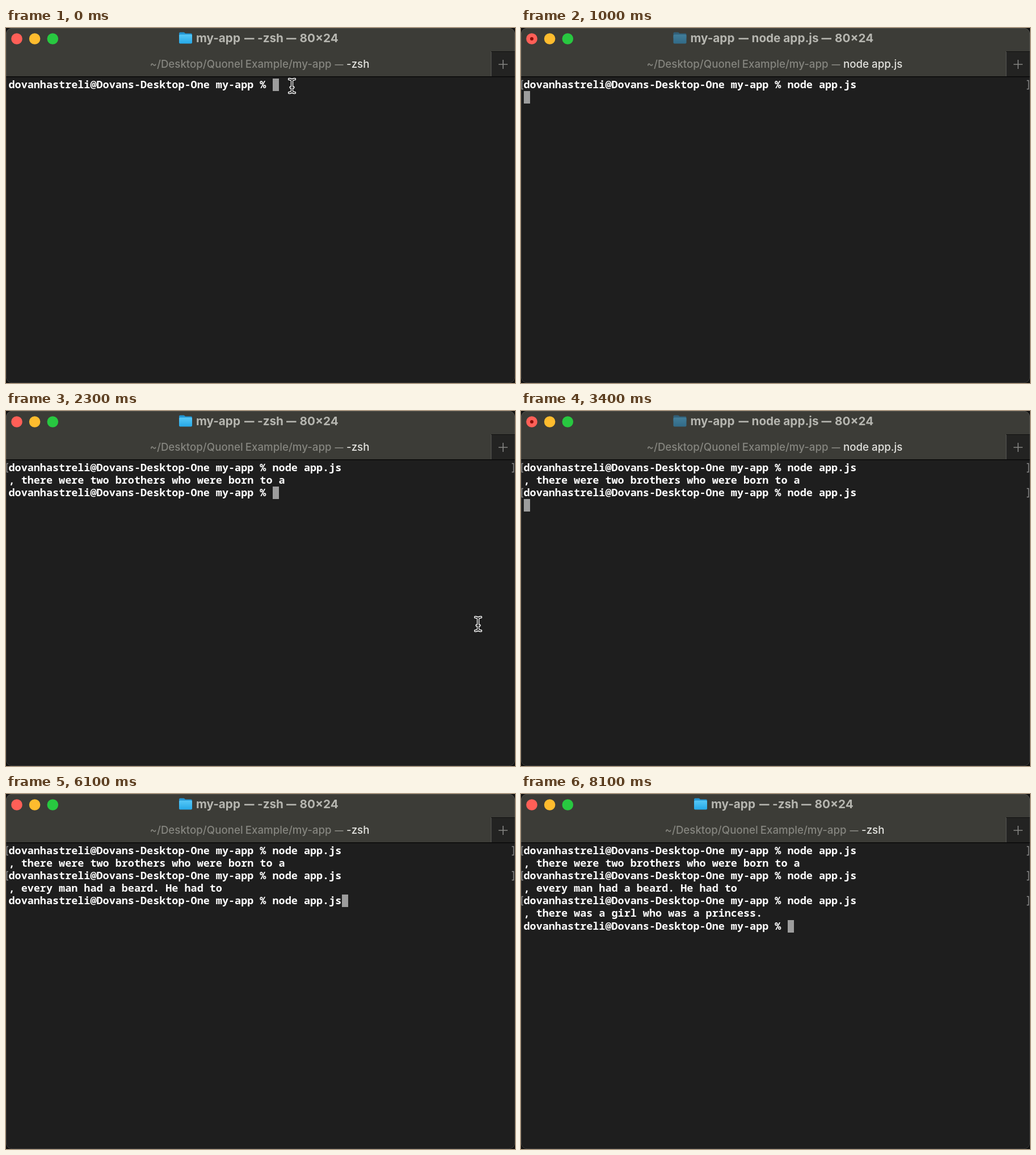
An HTML page with a canvas that plays this animation: 897x625 px, repeating every 9.66 s.

```html
<!DOCTYPE html>
<html lang="en">
<head>
<meta charset="utf-8">
<title>Terminal</title>
<style>
  html, body { margin: 0; width: 100%; height: 100%; overflow: hidden; background: #111; }
  canvas { display: block; width: 897px; height: 625px; }
</style>
</head>
<body>
<canvas id="stage" width="897" height="625"></canvas>
<script>
const ctx = document.getElementById('stage').getContext('2d');
const LOOP = 9660;
const MONO = '600 18.47px "Noto Sans Mono", monospace';
const BOLD = '700 20.7px Inter, sans-serif';
const SANS = '500 18.7px Inter, sans-serif';
const LEFT = 4.5, COL = 11.08, ROW = 22.17, TOP = 88.6;
const PROMPT = 'dovanhastreli@Dovans-Desktop-One my-app % ';
const COMMAND = 'node app.js';

// Each run: command recalled, return pressed, spinner shown, output printed.
const RUNS = [
  { typed: 100, enter: 700, spin: 1100, done: 1900, out: ', there were two brothers who were born to a' },
  { typed: 2700, enter: 3400, spin: 3700, done: 4400, out: ', every man had a beard. He had to' },
  { typed: 5900, enter: 6500, spin: 6800, done: 7400, out: ', there was a girl who was a princess.' }
];

// Pointer stops: time, x, y
const POINTER = [[1300, 905, 640], [1400, 890, 530], [1500, 868, 430],
                 [1600, 852, 373], [1800, 840, 373], [2000, 832, 375]];

function text(str, x, y, font, color, align = 'left') {
  ctx.font = font;
  ctx.fillStyle = color;
  ctx.textAlign = align;
  ctx.fillText(str, x, y);
}

function rect(x, y, w, h, color) {
  ctx.fillStyle = color;
  ctx.fillRect(x, y, w, h);
}

function disc(x, y, r, color) {
  ctx.fillStyle = color;
  ctx.beginPath();
  ctx.arc(x, y, r, 0, Math.PI * 2);
  ctx.fill();
}

function stroke(path, color, width) {
  ctx.strokeStyle = color;
  ctx.lineWidth = width;
  ctx.stroke(new Path2D(path));
}

function folder(x, dim) {
  const fill = ctx.createLinearGradient(0, 10, 0, 27);
  fill.addColorStop(0, dim ? '#437f9b' : '#5bcbf8');
  fill.addColorStop(1, dim ? '#326b88' : '#27a9e8');
  ctx.fillStyle = dim ? '#315f78' : '#2194d2';
  ctx.fill(new Path2D(`M${x} 9.5q0-2 2-2h6q1 0 2 1l1 1h10q2 0 2 2v6h-23z`));
  ctx.fillStyle = fill;
  ctx.beginPath();
  ctx.roundRect(x, 11.5, 23, 16, 2);
  ctx.fill();
}

function titleBar(busy) {
  rect(0, 0, 897, 85, '#3c3c37');
  rect(0, 85, 897, 1.5, '#090909');
  disc(19, 19, 9.8, '#ff5f57');
  disc(50.6, 19, 9.8, '#febc2e');
  disc(82.3, 19, 9.8, '#28c840');
  if (busy) disc(19, 19, 3, '#8c0d08');

  const x = busy ? 268.5 : 305;
  const gray = '#b6b6b0';
  const end = busy ? 261 : 189;
  folder(x, busy);
  text('my-app', x + 30, 24.5, BOLD, gray);
  rect(x + 115, 17.5, 17.5, 2.6, gray);
  text(busy ? COMMAND : '-zsh', x + 138, 24.5, BOLD, gray);
  rect(x + end, 17.5, 17.5, 2.6, gray);
  text('80×24', x + end + 23.5, 24.5, BOLD, gray);
}

function tabBar(busy) {
  const x = busy ? 221.5 : 253.5;
  const gray = '#85857f';
  text('~/Desktop/Quonel', x, 70, SANS, gray);
  text('Example/my-app', x + 320, 70, SANS, gray, 'right');
  rect(x + 326, 64, 15, 1.7, gray);
  text(busy ? COMMAND : '-zsh', x + 346.5, 70, SANS, '#e3e3df');
  rect(855, 41, 42, 44, '#232322');
  rect(854.5, 41, 1, 44, '#5b5b56');
  rect(855, 41, 42, 1, '#111');
  stroke('M868 64h16M876 56v16', '#858583', 1.6);
}

function spinner(head) {
  ctx.lineCap = 'round';
  for (let i = 0; i < 8; i++) {
    const age = (head - i + 80) % 8;
    const a = i * Math.PI / 4;
    const dx = Math.sin(a), dy = -Math.cos(a);
    stroke(`M${835.5 + dx * 6.5} ${63.5 + dy * 6.5}L${835.5 + dx * 11} ${63.5 + dy * 11}`,
           `rgba(236,236,230,${0.92 - age * 0.1})`, 2.5);
  }
  ctx.lineCap = 'butt';
}

function line(str, row) {
  text(str, LEFT, TOP + 17 + row * ROW, MONO, '#fff');
}

function brackets(row) {
  const y = Math.round(TOP + row * ROW) + 3.5;
  stroke(`M4 ${y}H1.5v15H4M891.5 ${y}h3v15h-3`, '#8e8e8e', 1.4);
}

function cursor(col, row) {
  rect(Math.round(LEFT + col * COL), Math.round(TOP + row * ROW), 11, 22, '#9d9d9d');
}

function terminal(t) {
  let row = 0;
  for (const run of RUNS) {
    const typed = t >= run.typed;
    line(PROMPT + (typed ? COMMAND : ''), row);
    if (t < run.enter) {
      cursor(PROMPT.length + (typed ? COMMAND.length : 0), row);
      return;
    }
    brackets(row++);
    if (t < run.done) {
      cursor(0, row);
      return;
    }
    line(run.out, row++);
  }
  line(PROMPT, row);
  cursor(PROMPT.length, row);
}

function pointerAt(t) {
  if (t < 700) return [504, 102];
  if (t < POINTER[0][0] || t >= 2700) return null;
  const next = POINTER.findIndex(p => p[0] > t);
  if (next < 0) return POINTER.at(-1).slice(1);
  const [t0, x0, y0] = POINTER[next - 1], [t1, x1, y1] = POINTER[next];
  const k = (t - t0) / (t1 - t0);
  return [x0 + (x1 - x0) * k, y0 + (y1 - y0) * k];
}

function pointer([x, y]) {
  const beam = 'M-5-12Q-1-12 0-9.5Q1-12 5-12M0-9.5V9.5M-2.5 2.5H2.5M-5 12Q-1 12 0 9.5Q1 12 5 12';
  ctx.save();
  ctx.translate(x, y);
  ctx.lineJoin = 'round';
  ctx.lineCap = 'round';
  stroke(beam, '#fff', 4.4);
  stroke(beam, '#111', 1.7);
  ctx.restore();
}

function draw(now) {
  const t = Math.floor(now % LOOP / 100) * 100;
  const active = RUNS.find(r => t >= r.enter && t < r.done);
  rect(0, 0, 897, 625, '#111');
  ctx.save();
  ctx.beginPath();
  ctx.roundRect(0, 0, 897, 625, 11);
  ctx.clip();
  rect(0, 0, 897, 625, '#1e1e1e');
  titleBar(!!active);
  tabBar(!!active);
  if (active && t >= active.spin) spinner((t - active.spin) / 100);
  terminal(t);
  ctx.strokeStyle = 'rgba(150,150,145,.4)';
  ctx.lineWidth = 1;
  ctx.beginPath();
  ctx.roundRect(0, 0, 897, 625, 11);
  ctx.stroke();
  const spot = pointerAt(t);
  if (spot) pointer(spot);
  ctx.restore();
}

const start = performance.now();
function tick() {
  draw(performance.now() - start);
  requestAnimationFrame(tick);
}
tick();
</script>
</body>
</html>
```
